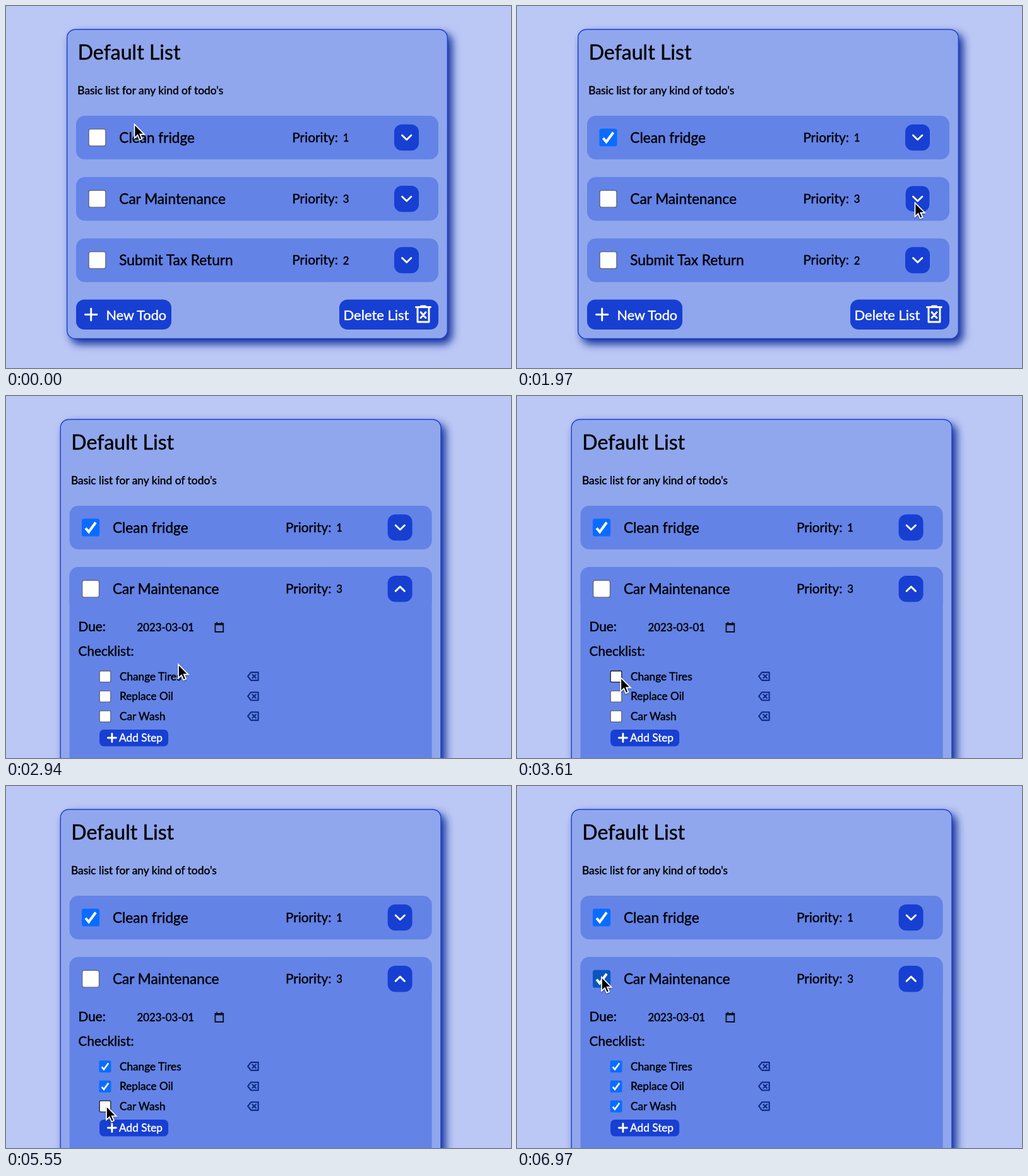
These frames come from a looping animation (800 px wide and 574 px high, 7000 ms). An HTML page:

```html
<!DOCTYPE html>
<html lang="en">
<head>
<meta charset="utf-8">
<title>Todo list</title>
<style>
html, body { margin: 0; width: 100%; height: 100%; overflow: hidden; background: #bbc8f5; }
svg { display: block; width: 800px; height: 574px; font-family: Lato, "Open Sans", sans-serif; }
text { stroke: currentColor; stroke-width: .45px; fill: currentColor; white-space: pre; }
.white { color: #fff; }
.panel { fill: #90a7ed; stroke: #1a41cf; stroke-width: 1.4px; }
.row { fill: #6383e7; }
.btn { fill: #173fd2; }
.hover .btn { stroke: #6f8bec; stroke-width: 1px; }
.line { fill: none; stroke: #fff; stroke-width: 2.9px; stroke-linecap: round; stroke-linejoin: round; }
.navy { stroke: #0e2a85; stroke-width: 2.1px; }
.box { fill: #fff; stroke: #5f6478; stroke-width: 1.3px; vector-effect: non-scaling-stroke; }
.hover .box { stroke: #222; }
.tick { visibility: hidden; stroke-width: 4px; stroke-linecap: butt; stroke-linejoin: miter; }
.on .box { fill: #0a6cff; stroke: #0a6cff; }
.on.hover .box { fill: #0a55c0; stroke: #0a55c0; }
.on .tick { visibility: visible; }
</style>
</head>
<body>
<svg viewBox="0 0 800 574">
  <defs>
    <filter id="shadow" x="-10%" y="-10%" width="120%" height="120%">
      <feDropShadow dx="6.5" dy="7.5" stdDeviation="7" flood-color="#0b2a98"/>
    </filter>
    <filter id="soft" x="-50%" y="-50%" width="200%" height="200%">
      <feDropShadow dx="0" dy="1.5" stdDeviation="1" flood-opacity=".35"/>
    </filter>
  </defs>
  <g id="card"></g>
  <g id="cursor">
    <path id="arrow" filter="url(#soft)" stroke="#fff" stroke-width="1.7"
      d="M1 2V23.8L6 19.2L9.2 26.7L13 25.1L9.8 17.8H16.6Z"/>
    <g id="beam" fill="none" stroke-linecap="round">
      <path stroke="#fff" stroke-width="4" d="M-5-11.5Q0-11.5 0-8Q0-11.5 5-11.5M0-8V8M-5 11.5Q0 11.5 0 8Q0 11.5 5 11.5M-3 2H3"/>
      <path stroke="#000" stroke-width="1.8" d="M-5-11.5Q0-11.5 0-8Q0-11.5 5-11.5M0-8V8M-5 11.5Q0 11.5 0 8Q0 11.5 5 11.5M-3 2H3"/>
    </g>
  </g>
</svg>
<script>
const LOOP = 7000, OPEN_AT = 2240, SHIFT = -10.4, PITCH = 97.25;
const $ = id => document.getElementById(id);

const text = (x, y, size, s, cls = '') =>
  `<text x="${x}" y="${y}" font-size="${size}" class="${cls}">${s}</text>`;
const rect = (x, y, w, h, r, cls) =>
  `<rect x="${x}" y="${y}" width="${w}" height="${h}" rx="${r}" class="${cls}"/>`;
const line = (d, cls = '') => `<path d="${d}" class="line ${cls}"/>`;

// Checkboxes: centre, side length and time of the click
const checks = [
  { id: 'c0', x: 144.5, y: 208.5, size: 28, at: 620 },
  { id: 'c1', x: 144.5, y: 305.8, size: 28, at: 6860 },
  { id: 'c2', x: 144.5, y: 403, size: 28, at: Infinity },
  { id: 's0', x: 167.4, y: 444.8, size: 18.4, at: 3850 },
  { id: 's1', x: 167.4, y: 476.4, size: 18.4, at: 4750 },
  { id: 's2', x: 167.4, y: 508, size: 18.4, at: 5680 }
];
const check = i => {
  const { id, x, y, size } = checks[i];
  return `<g id="${id}" transform="translate(${x} ${y}) scale(${size / 28})">` +
    rect(-13.4, -13.4, 26.8, 26.8, 3, 'box') + line('M-8 1L-3 7L8-8', 'tick') + '</g>';
};

function row(i, name, priority) {
  const y = 174 + i * PITCH;
  return rect(111, y, 574, 69.3, 14, 'row') +
    check(i) + text(179.3, y + 42.8, 22.6, name) +
    text(453.3, y + 41.5, 20.8, 'Priority:') + text(533.7, y + 41, 16.6, priority) +
    `<g id="toggle${i}">` + rect(615, y + 13.7, 39, 41.5, 12, 'btn') +
    line(`M627.5 ${y + 31}l7.2 7l7.2-7`, 'down') + '</g>';
}
function step(i, name) {
  const { y } = checks[i + 3];
  return check(i + 3) + text(190.4, y + 6, 17.2, name) +
    line(`M393.5 ${y - .3}l5-6.4h11.5v12.8h-11.5zm7.2-2.8l5.6 5.6m0-5.6l-5.6 5.6`, 'navy');
}

$('card').innerHTML =
  `<g filter="url(#shadow)"><rect id="panel" x="96.7" y="37.2" width="602.6" rx="13" class="panel"/></g>` +
  text(113.7, 85, 32.1, 'Default List') +
  text(113.3, 140.3, 17.4, "Basic list for any kind of todo's") +
  row(0, 'Clean fridge', 1) +
  `<g id="details">` + rect(111, 271.2, 574, 400, 14, 'row') +
    text(125, 373.3, 20.8, 'Due:') + text(218, 373, 16.8, '2023-03-01') +
    `<path d="M341.8 361h12.8v13h-12.8zM341 362.6h14.4M344.5 358.6v3M352 358.6v3" fill="none" stroke="#111" stroke-width="1.9"/>` +
    text(125, 411.5, 20.7, 'Checklist:') +
    step(0, 'Change Tires') + step(1, 'Replace Oil') + step(2, 'Car Wash') +
    rect(158.5, 529, 109, 26.5, 7, 'btn') + line('M171.8 542h13m-6.5-6.5v13') +
    text(189.5, 548.3, 17.2, 'Add Step', 'white') + '</g>' +
  row(1, 'Car Maintenance', 3) +
  `<g id="rest">` + row(2, 'Submit Tax Return', 2) +
    rect(111, 465.5, 151, 47.5, 13, 'btn') + line('M125.5 489.3h18.5m-9.25-9.25v18.5') +
    text(158.5, 497.6, 21.6, 'New Todo', 'white') +
    rect(528, 465.5, 157, 47.5, 13, 'btn') + text(534.5, 497.6, 22, 'Delete List', 'white') +
    line('M649.5 477.5h23m-20.5 0v23.5h18v-23.5m-13 8l8 9m0-9l-8 9M657.5 476h7') + '</g>';

// Pointer stops: time, x, y; equal neighbours are rests
const path = [
  [0, 202.5, 185.5], [100, 202.5, 185.5], [450, 146, 208], [720, 146, 208],
  [1150, 404, 224], [1700, 629.5, 310], [2400, 629.5, 310], [2940, 272, 423.5],
  [3500, 163.3, 444.5], [4050, 163.3, 444.5], [4500, 160, 475], [4900, 160, 475],
  [5350, 158, 505.5], [5850, 158, 505.5], [6550, 133, 301], [LOOP, 133, 301]
];
function pointer(t) {
  const i = path.findIndex(p => p[0] > t);
  const [t0, x0, y0] = path[i - 1], [t1, x1, y1] = path[i];
  const u = (t - t0) / (t1 - t0), e = u * u * (3 - 2 * u);
  return [x0 + (x1 - x0) * e, y0 + (y1 - y0) * e];
}
const show = (id, on) => $(id).style.display = on ? '' : 'none';

function draw(now) {
  const t = now % LOOP, open = t >= OPEN_AT, dx = open ? SHIFT : 0;
  const [x, y] = pointer(t);
  $('card').setAttribute('transform', `translate(${dx})`);
  $('panel').setAttribute('height', open ? 700 : 490.3);
  show('details', open);
  show('rest', !open);
  const chevron = document.querySelector('#toggle1 .down');
  chevron.setAttribute('transform', open ? 'rotate(180 634.7 305.8)' : '');
  $('toggle1').classList.toggle('hover', Math.abs(x - dx - 634.5) < 20 && Math.abs(y - 305.8) < 21);
  for (const c of checks) {
    const half = c.size / 2, list = $(c.id).classList;
    list.toggle('on', t >= c.at);
    list.toggle('hover', Math.abs(x - dx - c.x) < half && Math.abs(y - c.y) < half);
  }
  const typing = x > 175 && x < 435 && y > 194 && y < 228;
  show('arrow', !typing);
  show('beam', typing);
  $('cursor').setAttribute('transform', `translate(${x} ${y})`);
}

const start = performance.now();
function tick() {
  draw(performance.now() - start);
  requestAnimationFrame(tick);
}
tick();
</script>
</body>
</html>
```
